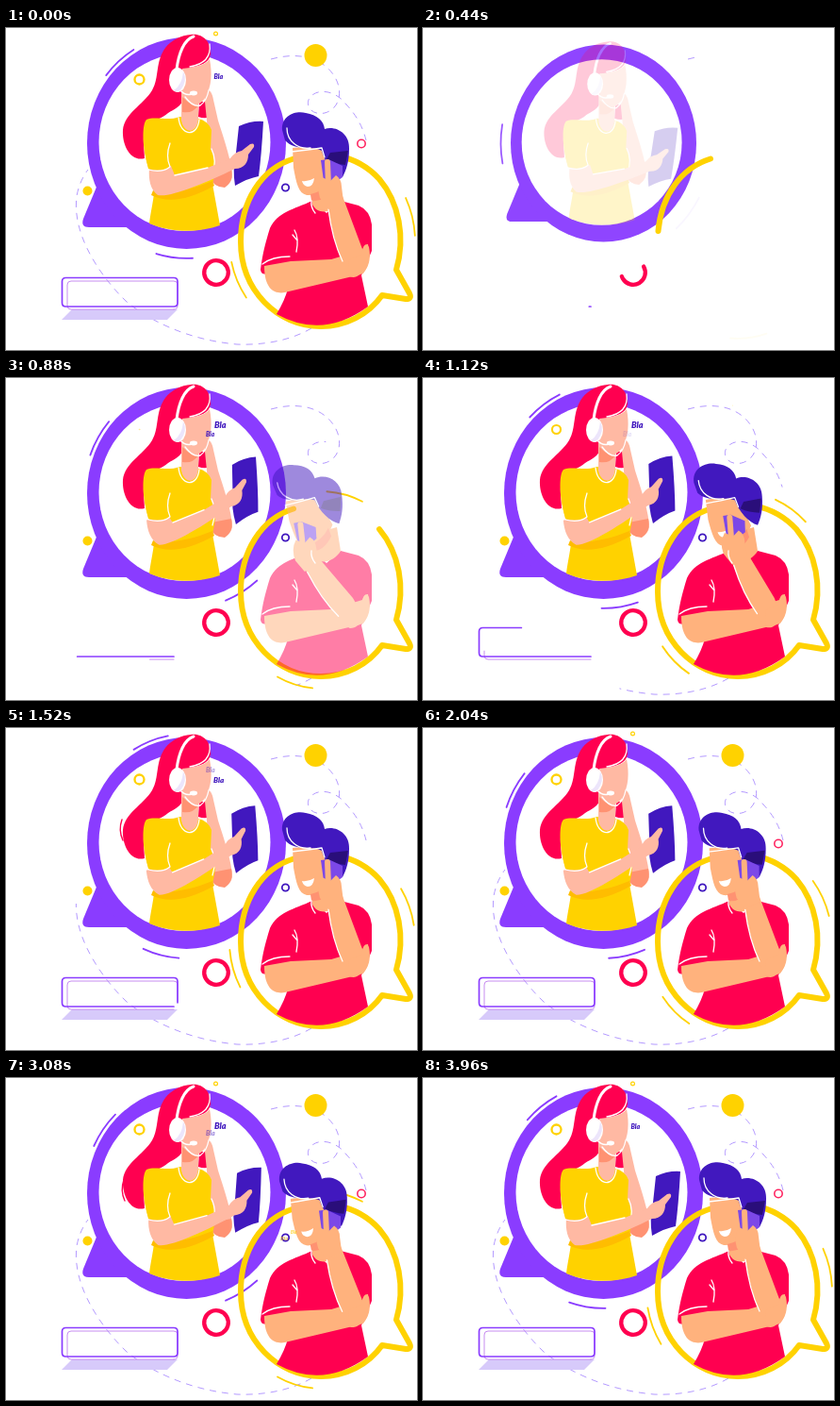
Write an HTML page that moves like this. It is 436 px wide and 341 px high and loops after 4000 ms.

```html
<!DOCTYPE html>
<html lang="en">
<head>
<meta charset="utf-8">
<title>Support call</title>
<style>
html, body { margin: 0; width: 100%; height: 100%; overflow: hidden; background: #fff; }
svg { display: block; width: 100%; height: 100%; }
[data-pop] { transform-box: fill-box; transform-origin: center; }
text { font: italic 900 9px Lato, "Open Sans", sans-serif; }
.line { fill: none; stroke-linecap: round; stroke-linejoin: round; }
.trail { fill: none; stroke: #b49aff; }
.white { stroke: #fff; stroke-width: 1.3; }
.violet { stroke: #8a3cff; }
.gold { stroke: #ffd200; }
.ink { fill: #4118be; }
.red { fill: #ff0050; }
.yellow { fill: #ffd200; }
.skin { fill: #ffb9a3; }
.tan { fill: #ffb27d; }
.shade { fill: #ff9272; }
</style>
</head>
<body>
<svg viewBox="0 0 436 341">
  <path id="trailTop" class="trail" d="M281 33C310 25 334 31 347 49C359 66 354 86 338 90C324 93 317 82 322 74C330 63 350 66 361 81Q377 98 382 119"/>
  <path id="trailLow" class="trail" d="M324 318C300 332 270 336 245 335C190 330 150 308 128 290C95 258 70 215 75 178Q78 162 87 150"/>

  <path data-fade="1150 1450" fill="#d7cafa" d="M70 298H182L171 309H59Z"/>
  <path data-draw="700 1640" class="line" stroke="#c78cf0" d="M178 298H69Q65 298 65 294V272Q65 268 69 268H178Q182 268 182 272V294Q182 298 178 298"/>
  <path data-draw="380 1640" class="line violet" stroke-width="1.7" d="M178 295H63.500Q59.500 295 59.500 291V268.500Q59.500 264.500 63.500 264.500H178Q182 264.500 182 268.500V291Q182 295 178 295"/>

  <g id="bubble">
    <path fill="#8a3cff" d="M97 166L82 202Q79 211 88 211L132 211Z"/>
    <ellipse cx="191.5" cy="122" rx="105.5" ry="112" fill="#8a3cff"/>
    <ellipse cx="189.500" cy="121" rx="91" ry="94" fill="#fff"/>
    <g data-fade="290 780">
      <path id="strand" class="line" stroke="#ff0050" stroke-width="1.4" d="M123 97Q119 108 124 119"/>
      <path class="red" d="M196 7C208 5 218 14 217 28C215 38 205 40 195 42L190 72C186 84 178 86 172 90C165 97 152 98 148 105C144 115 147 130 147 138C132 142 123 124 124 108C126 90 145 82 155 66C163 52 158 36 169 21C176 12 186 8 196 7ZM205 78H217L220 93Q212 97 204 94Z"/>
      <path class="skin" d="M210 68C214 61 219 68 220 76L225 98C232 120 240 143 240 158C237 172 222 170 217 160L213 98Z"/>
      <path class="shade" d="M218 153L239 149Q242 162 232 169Q221 169 216 158Z"/>
      <path class="yellow" d="M184 94C172 99 158 93 149 97C144 102 144 128 152 150L158 152C159 175 154 190 152 207C175 217 205 217 227 209L219 165C223 150 223 140 217 128L218 108Q214 98 204 96Z"/>
      <path class="skin" d="M186 68V98C189 113 203 112 204 96V78Z"/>
      <path class="shade" d="M187 73Q196 82 204 82Q198 91 187 89Z"/>
      <path class="skin" d="M187 43C198 42 211 40 216 33C219 48 218 62 212 72C207 83 199 82 194 77L187 70Z"/>
      <path class="line white" d="M183 95C185 115 203 116 205 97M216 17C218 33 207 39 195 41M218 128Q224 140 219 156M190 73Q198 84 206 82Q213 77 215 66"/>
      <path fill="#ffbd00" d="M154 177Q180 190 221 167L219 162C195 172 170 176 156 172Z"/>
      <g id="tablet"><path class="ink" d="M247 104Q260 98 273 99Q271 135 268 157Q257 159 243 167Q240 150 244 132Z"/></g>
      <g id="forearm">
        <path class="skin" d="M152 149C151 160 153 171 161 177C174 180 212 164 243 149C253 149 257 142 257 134L263 126Q264 121 259 123L250 130Q243 131 238 138L214 148L179 156L175 146Z"/>
        <path class="line white" d="M179 156L214 148"/>
      </g>
      <path class="yellow" d="M148 105Q145 130 151 149Q165 153 174 147L176 112Z"/>
      <path class="line white" d="M151 150Q165 154 174 147Q169 136 174 122"/>
      <path class="line white" style="stroke-width:3" d="M181 44C183 27 189 12 199 9"/>
      <ellipse cx="182" cy="55" rx="9" ry="13" fill="#fff"/>
      <path fill="#ece5fb" d="M188 46Q193 56 185 66Q180 68 178 66Q187 60 188 46Z"/>
      <path class="line white" style="stroke-width:1.6" d="M185 66Q190 72 197 70"/>
      <ellipse cx="199" cy="69" rx="4" ry="2.4" fill="#fff"/>
    </g>
  </g>

  <circle data-draw="180 680" class="line" cx="223" cy="259" r="12.8" stroke="#ff0050" stroke-width="4.3" transform="rotate(-30 223 259)"/>
  <g id="arcs"></g>
  <path data-draw="182 1138" class="line gold" stroke-width="6" d="M305 138.5C271 149 249 183 249 226C249 278 288 316 334 316C360 316 384 304 399 283L424 287Q431 287 428 281L414 256C424 222 417 185 396 160C371 133 336 129 305 138.5"/>

  <g data-fade="690 1070">
    <path class="red" d="M325 183C305 192 288 195 280 212C275 228 272 240 270 256Q271 262 277 260L298 254L299 276Q296 288 287 303Q336 330 384 295L377 262L388 236V208Q386 193 374 188L355 183L340 196Z"/>
    <path class="tan" d="M322 166L325 187C332 200 349 194 355 183L351 158Z"/>
    <g id="head">
      <path class="tan" d="M304 127L336 124L350 158C344 170 330 178 319 177C310 175 308 164 305 148Z"/>
      <path class="shade" d="M323 176Q337 173 345 161L347 170Q337 185 324 183Z"/>
      <path class="ink" d="M293 108C292 92 308 87 318 90C330 92 337 98 338 107C350 103 365 112 364 128C364 142 361 150 357 158C348 155 338 142 335 130C325 124 307 131 296 119Z"/>
      <path fill="#2a0e7a" d="M344 132L363 130L360 145Q349 144 340 139Z"/>
      <path class="line white" d="M298 106C298 120 310 129 323 127M303 131Q321 129 335 127L338 137"/>
      <path fill="#fff" d="M314 162Q321 163 327 159Q326 168 320 168Q315 167 314 162Z"/>
    </g>
    <path class="tan" d="M274 252C274 280 288 283 300 279L368 263C384 262 388 246 385 232Q381 226 378 235L345 245L302 247Z"/>
    <g id="armUp">
      <path class="tan" d="M337 176L357 178L378 234C382 252 377 268 364 263C354 250 346 215 341 190Z"/>
      <path class="line white" d="M342 192Q346 224 357 247"/>
      <g id="hand">
        <path fill="#7c48e8" d="M334 140L342 139L357 146L357 158L349 164L337 162Z"/>
        <path class="line" stroke="#ffb27d" stroke-width="6" d="M341 142L342 166"/>
        <path class="tan" d="M333 180Q329 168 335 158L344 162L350 156Q356 160 356 168L358 184L342 192Z"/>
      </g>
    </g>
    <path class="tan" d="M363 246L377 240Q379 228 384 229Q388 248 379 260L364 263Z"/>
    <path class="line white" d="M272 250Q282 242 301 242M306 214Q311 222 308 237M304 219L309 225M324 183Q323 190 328 196"/>
  </g>

  <circle data-pop="800 1200" class="line gold" cx="141.5" cy="54.5" r="5" stroke-width="2.3"/>
  <circle data-pop="520 820" class="yellow" cx="86.5" cy="172.5" r="5"/>
  <circle data-pop="1080 1480" class="yellow" cx="328.5" cy="29" r="12"/>
  <circle data-pop="1600 1950" class="line gold" cx="222.5" cy="6" r="1.9" stroke-width="1.2"/>
  <circle data-pop="1600 1950" class="line" cx="377" cy="122.5" r="4.2" stroke="#ff2460" stroke-width="1.6"/>
  <circle data-pop="600 860" class="line" cx="296.5" cy="169" r="3.7" stroke="#4118be" stroke-width="1.8"/>
  <g id="words"></g>
</svg>
<script>
const LOOP = 4000;
const NS = "http://www.w3.org/2000/svg";
const $ = id => document.getElementById(id);
const clamp = x => Math.max(0, Math.min(1, x));
const smooth = x => (1 - Math.cos(Math.PI * clamp(x))) / 2;
const span = (t, a, b) => smooth((t - a) / (b - a));
const swing = (t, low, period) => (1 - Math.cos(2 * Math.PI * (t - low) / period)) / 2;

function add(parent, tag, attrs) {
  const el = parent.appendChild(document.createElementNS(NS, tag));
  for (const key in attrs) el.setAttribute(key, attrs[key]);
  return el;
}

// Eased value along [time, value] points.
function track(t, points) {
  if (t <= points[0][0]) return points[0][1];
  for (let i = 1; i < points.length; i++) {
    const [a, from] = points[i - 1], [b, to] = points[i];
    if (t < b) return from + (to - from) * span(t, a, b);
  }
  return points.at(-1)[1];
}

const timed = name => [...document.querySelectorAll(`[data-${name}]`)].map(el => {
  const [a, b] = el.dataset[name].split(" ").map(Number);
  return { el, a, b };
});
const pops = timed("pop"), fades = timed("fade"), draws = timed("draw");
draws.forEach(({ el }) => el.setAttribute("pathLength", 1));

// Short strokes that swing around the two speech bubbles.
const arcs = [
  { cx: 191.5, cy: 122, r: 109, from: 179, to: 250, cls: "violet", low: 380, period: 2150, shown: 330 },
  { cx: 191.5, cy: 122, r: 115, from: 38, to: 104, cls: "violet", low: 460, period: 2200, shown: 420 },
  { cx: 334, cy: 226, r: 97, from: 83, to: 164, cls: "gold", low: 480, period: 2200, shown: 420 },
  { cx: 334, cy: 226, r: 100, from: -83, to: -14, cls: "gold", low: 640, period: 2200, shown: 520 }
];
for (const arc of arcs) {
  const half = 19.5 / arc.r, x = arc.r * Math.cos(half), y = arc.r * Math.sin(half);
  arc.el = add($("arcs"), "path", {
    class: "line " + arc.cls, "stroke-width": 1.8,
    d: `M${x} ${-y}A${arc.r} ${arc.r} 0 0 1 ${x} ${y}`
  });
}

// x, y, size, start, end, strength, colour
const words = [
  [212, 62, 6.5, 780, 1150, 1, "#4118be"],
  [221, 53, 9, 740, 1250, 1, "#4118be"],
  [212, 47, 7, 1250, 1680, .4, "#4118be"],
  [220, 58, 8, 1320, 1760, 1, "#4118be"],
  [221, 54, 9, 2850, 3350, 1, "#4118be"],
  [212, 61, 7, 2900, 3250, .5, "#4118be"],
  [220.5, 54, 7, 3760, 4300, 1, "#4118be"],
  [297, 161, 6, 2330, 2720, 1, "#ffc800"],
  [302, 165, 4.5, 2950, 3250, .7, "#ffc800"],
  [291, 172, 6, 2900, 3300, .7, "#d6a92a"]
].map(([x, y, size, start, end, strength, fill]) => {
  const el = add($("words"), "text", { x, y, fill });
  el.style.fontSize = size + "px";
  el.textContent = "Bla";
  return { el, start, end, strength };
});

function dashTo(el, part) {
  const end = part * el.getTotalLength(), dashes = [];
  for (let s = 0; s < end; s += 13) dashes.push(Math.min(7, end - s), 6);
  el.setAttribute("stroke-dasharray", [...dashes, 0, 9999].join(" "));
}

function render(t) {
  for (const { el, a, b } of pops) el.style.transform = `scale(${span(t, a, b)})`;
  for (const { el, a, b } of fades) el.style.opacity = span(t, a, b);
  for (const { el, a, b } of draws) {
    const part = span(t, a, b);
    el.style.visibility = part > 0 ? "visible" : "hidden";
    el.setAttribute("stroke-dasharray", part < 1 ? `${part} 2` : "none");
  }
  dashTo($("trailTop"), span(t, 340, 1190));
  dashTo($("trailLow"), span(t, 740, 1730));

  const grow = clamp((t - 40) / 540), size = 1 - (1 - grow) ** 2;
  $("bubble").setAttribute("transform", `translate(191.5 122) scale(${size}) translate(-191.5 -122)`);
  $("bubble").style.opacity = clamp((t - 60) / 400);

  for (const { el, cx, cy, from, to, low, period, shown } of arcs) {
    const angle = from + (to - from) * swing(t, low, period);
    el.setAttribute("transform", `translate(${cx} ${cy}) scale(1 1.06) rotate(${angle})`);
    el.style.opacity = span(t, shown, shown + 150);
  }

  const lift = track(t, [[400, -.35], [900, .92], [1200, 1], [2520, 1], [3300, .08], [3600, 0]]);
  $("forearm").setAttribute("transform", `rotate(${-10 * lift} 160 168)`);
  $("tablet").setAttribute("transform", `translate(${-4 * lift} ${-15 * lift}) rotate(${-8 * lift} 258 132)`);
  $("strand").setAttribute("transform", `translate(${t < 2200 ? 0 : 2} ${t < 2200 ? 0 : 11})`);
  $("strand").style.opacity = track(t, [[1250, 0], [1500, 1], [1800, 0], [2700, 0], [3050, 1], [3400, 0]]);

  const tilt = track(t, [[860, -8], [1420, 0], [1900, 0], [2450, -2.4], [3150, -2.3], [3800, 0]]);
  $("head").setAttribute("transform", `rotate(${tilt} 328 182)`);
  const arm = track(t, [[860, -20], [1400, 0], [1900, 0], [2450, -1.5], [3150, -1.3], [3800, 0]]);
  $("armUp").setAttribute("transform", `rotate(${arm} 370 262)`);
  $("hand").setAttribute("transform", `rotate(${-.8 * arm} 347 182)`);

  for (const { el, start, end, strength } of words)
    el.style.opacity = strength * Math.min(span(t, start, start + 120), 1 - span(t, end - 120, end));
}

const begin = performance.now();
function frame() {
  const t = (performance.now() - begin) % LOOP;
  // The finished scene holds for one beat before the intro restarts.
  render(t < 40 ? t + LOOP : t);
  requestAnimationFrame(frame);
}
frame();
</script>
</body>
</html>
```
